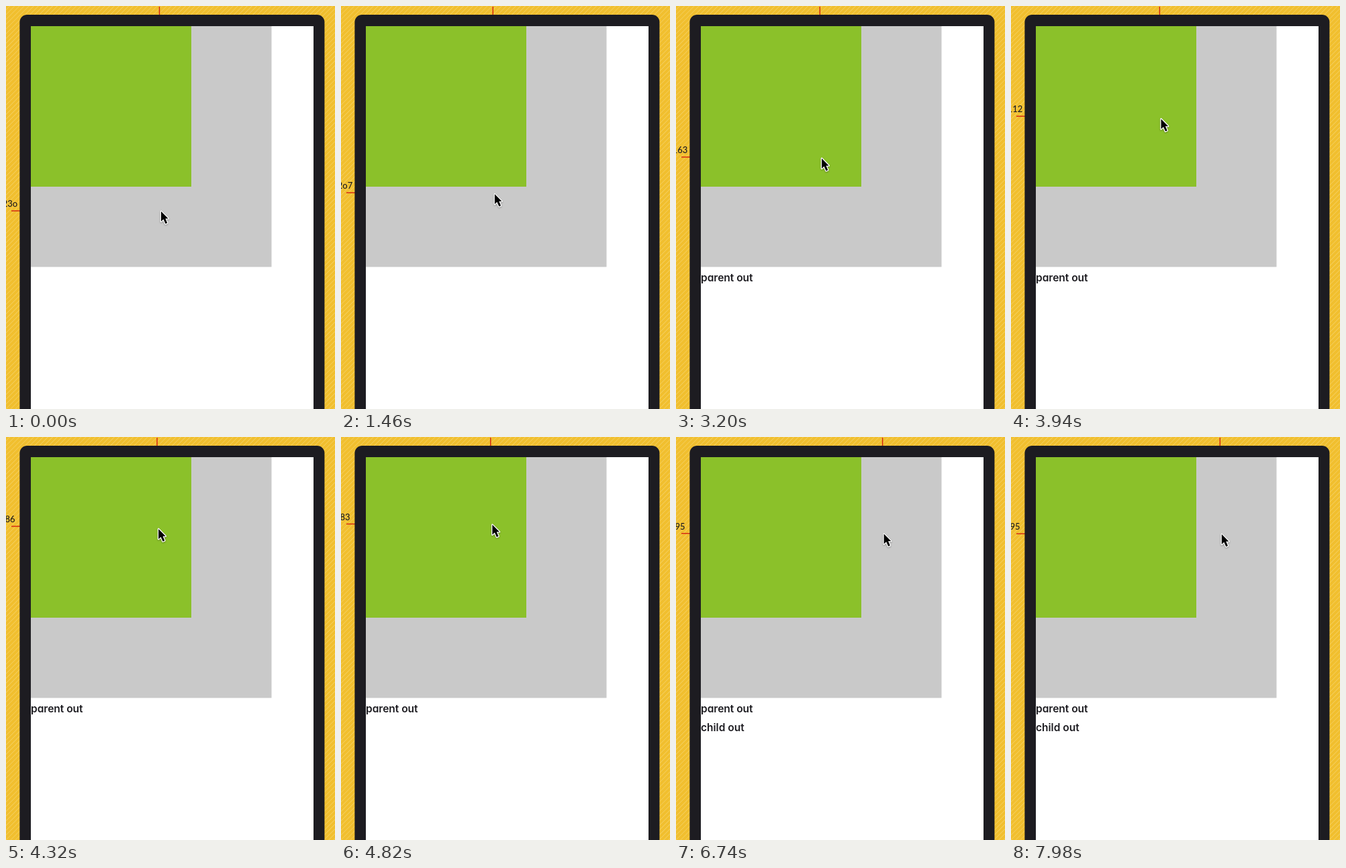
Write an HTML page that moves like this. It is 490 px wide and 600 px high and loops after 8000 ms.

```html
<!DOCTYPE html>
<html lang="en">
<head>
<meta charset="utf-8">
<title>Mouse out</title>
<style>
  html, body { margin: 0; width: 100%; height: 100%; overflow: hidden; }
  body {
    background: repeating-linear-gradient(135deg, #f1bf2e 0 3.3px, #f3ca50 3.8px 4.5px, #f1bf2e 5px);
  }
  svg { display: block; position: absolute; inset: 0; }
  .ruler { stroke: #d3200f; stroke-width: 1.4; }
  text { fill: #1d1c21; }
  .value { font: 500 13px Lato, sans-serif; text-anchor: middle; }
  .log { font: 600 15.5px Inter, sans-serif; font-feature-settings: "cv11"; }
  .cursor {
    stroke: #fff; stroke-width: 2.6; stroke-linejoin: round; paint-order: stroke;
    filter: drop-shadow(0 1px 1px rgba(0, 0, 0, .3));
  }
</style>
</head>
<body>
<svg width="490" height="600" viewBox="0 0 490 600">
  <line id="tickX" class="ruler" y1="1" y2="14"/>
  <g id="tickY">
    <line class="ruler" x1="8" x2="22"/>
    <text id="value" class="value" x="6" y="-6"></text>
  </g>
  <rect x="20.4" y="13" width="454" height="620" rx="11" fill="#1d1c21"/>
  <rect x="37" y="30" width="421" height="570" fill="#fff"/>
  <rect x="37" y="30" width="358.5" height="358.5" fill="#c9c9c9"/>
  <rect x="37" y="30" width="239" height="239" fill="#8bc12a"/>
  <text id="parentLog" class="log" x="37" y="409.5">parent out</text>
  <text id="childLog" class="log" x="37" y="437.5">child out</text>
  <path id="cursor" class="cursor" d="M0 0V15L3.5 11.7L6.5 18.4L9.2 17.2L6.4 10.7H10.6Z"/>
</svg>
<script>
  const LOOP = 8000, PAGE_TOP = 30, PAGE_SCALE = 1.195, CURSOR_LAG = 40;
  const GREEN_RIGHT = 276, GREEN_BOTTOM = 269;
  const el = id => document.getElementById(id);

  // The pointer rests, climbs into the green square and leaves it to the right.
  const path = [
    { time: 640, x: 228.5, y: 305 },
    { time: 1460, x: 226.3, y: 278 },
    { time: 3200, x: 214.3, y: 225 },
    { time: 4320, x: 225, y: 133 },
    { time: 4820, x: 222.7, y: 129.5 },
    { time: 5640, x: 278, y: 140.5 },
    { time: 7760, x: 311.3, y: 144, ease: k => 1 - (1 - k) ** 3 }
  ];

  function pointerAt(time) {
    const next = path.findIndex(point => point.time > time);
    if (next < 0) return path[path.length - 1];
    if (next === 0) return path[0];
    const from = path[next - 1], to = path[next];
    const linear = (time - from.time) / (to.time - from.time);
    const k = to.ease ? to.ease(linear) : linear;
    return { x: from.x + (to.x - from.x) * k, y: from.y + (to.y - from.y) * k };
  }

  const move = (id, x, y) => el(id).setAttribute("transform", `translate(${x} ${y})`);
  const show = (id, visible) => { el(id).style.display = visible ? "" : "none"; };

  function draw() {
    const time = performance.now() % LOOP;
    const pointer = pointerAt(time);
    const cursor = pointerAt(time - CURSOR_LAG);
    move("tickX", pointer.x, 0);
    move("tickY", 0, pointer.y);
    move("cursor", cursor.x + 2.5, cursor.y + 0.8);
    // Zeros are written small, like the letter o.
    const value = Math.floor((pointer.y - PAGE_TOP) / PAGE_SCALE);
    el("value").textContent = String(value).replace(/0/g, "o");
    show("parentLog", pointer.y < GREEN_BOTTOM);
    show("childLog", pointer.x > GREEN_RIGHT);
    requestAnimationFrame(draw);
  }
  draw();
</script>
</body>
</html>
```
